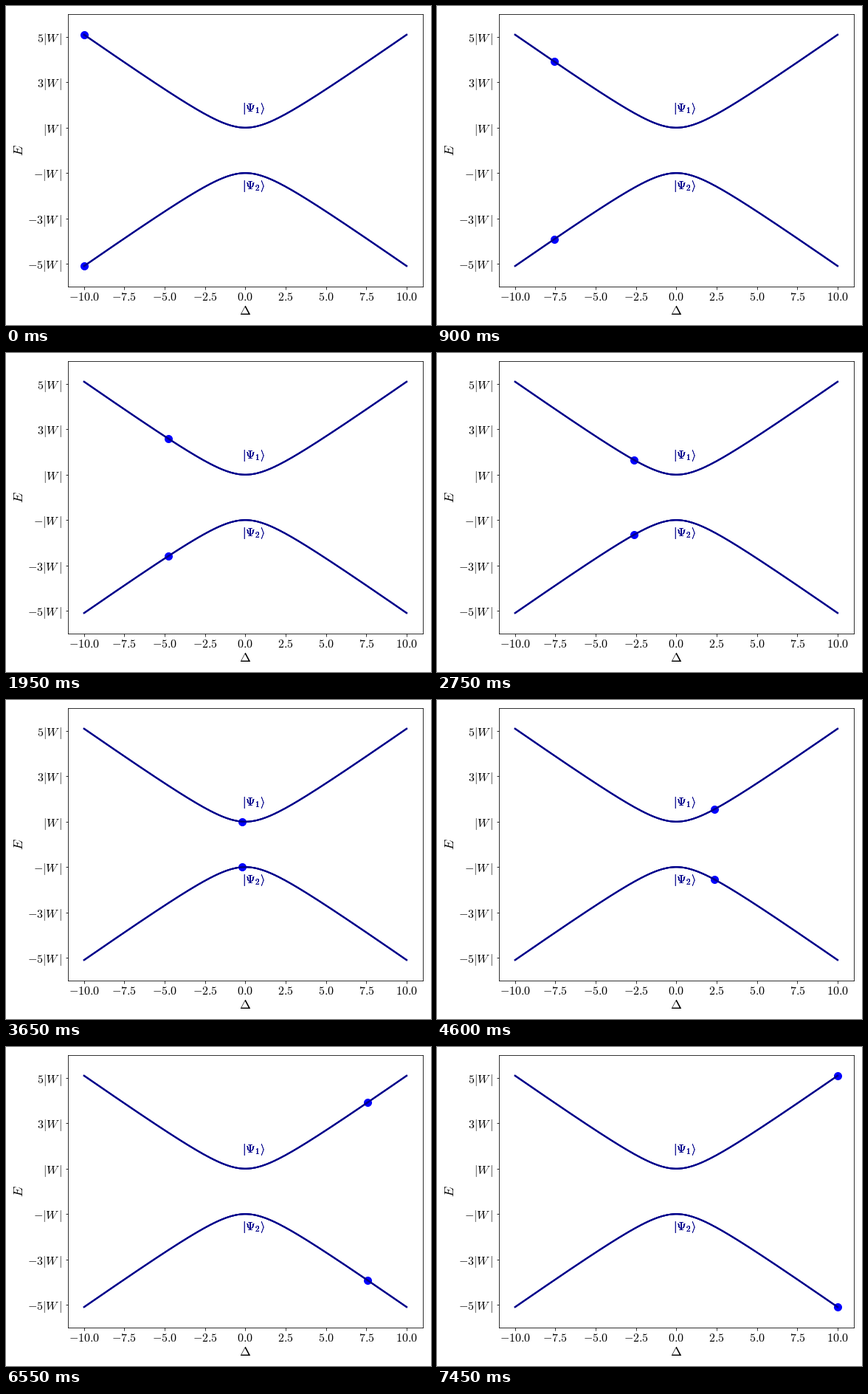
These frames come from a looping animation (576x432 px, 7.5 s). A matplotlib script:

```python
import numpy as np
import matplotlib.pyplot as plt
from matplotlib.animation import FuncAnimation

W, H, DPI = 576, 432, 72
FRAMES, LOOP_MS = 150, 7500

plt.rcParams.update({
    "mathtext.fontset": "cm",
    "font.size": 16,
    "axes.unicode_minus": True,
})


def energy(delta):
    """Upper branch of the avoided crossing, in units of |W|."""
    return np.sqrt(1 + delta**2 / 4)


def energy_label(k):
    sign = "-" if k < 0 else ""
    count = "" if abs(k) == 1 else str(abs(k))
    return rf"${sign}{count}|W\,|$"


def axis_label(x, y, text, rotation=0):
    fig.text(x / W, 1 - y / H, text, size=18, rotation=rotation,
             rotation_mode="anchor", ha="center", va="baseline")


fig = plt.figure(figsize=(W / DPI, H / DPI), dpi=DPI, facecolor="white")
left, right, top, bottom = 84.0, 564.8, 11.2, 379.8
ax = fig.add_axes([left / W, 1 - bottom / H, (right - left) / W, (bottom - top) / H])
ax.set_xlim(-11, 11)
ax.set_ylim(-6, 6)

xticks = np.arange(-10, 10.1, 2.5)
yticks = range(-5, 6, 2)
ax.set_xticks(xticks, [f"${x:.1f}$" for x in xticks])
ax.set_yticks(yticks, [energy_label(k) for k in yticks])
ax.tick_params(axis="y", pad=4.6)

axis_label((left + right) / 2, 418, r"$\Delta$")
axis_label(23, (top + bottom) / 2, "$E$", rotation=90)

delta = np.linspace(-10, 10, FRAMES)
for n, sign in ((1, 1), (2, -1)):
    # \mathcal{i} is the text-size ket bracket; repeated passes harden the edges
    ket = rf"$|\Psi_{n}\mathcal{{i}}$"
    for _ in range(3):
        ax.plot(delta, sign * energy(delta), color="darkblue", lw=2, zorder=3)
        ax.text(-0.2, sign * 1.7, ket, color="darkblue", va="baseline")

dots, = ax.plot([], [], "o", color="blue", ms=10, zorder=2)


def update(i):
    x, e = delta[i], energy(delta[i])
    dots.set_data([x, x], [e, -e])
    return dots,


anim = FuncAnimation(fig, update, frames=FRAMES, interval=LOOP_MS / FRAMES,
                     repeat=True, repeat_delay=0)
plt.show()
```
